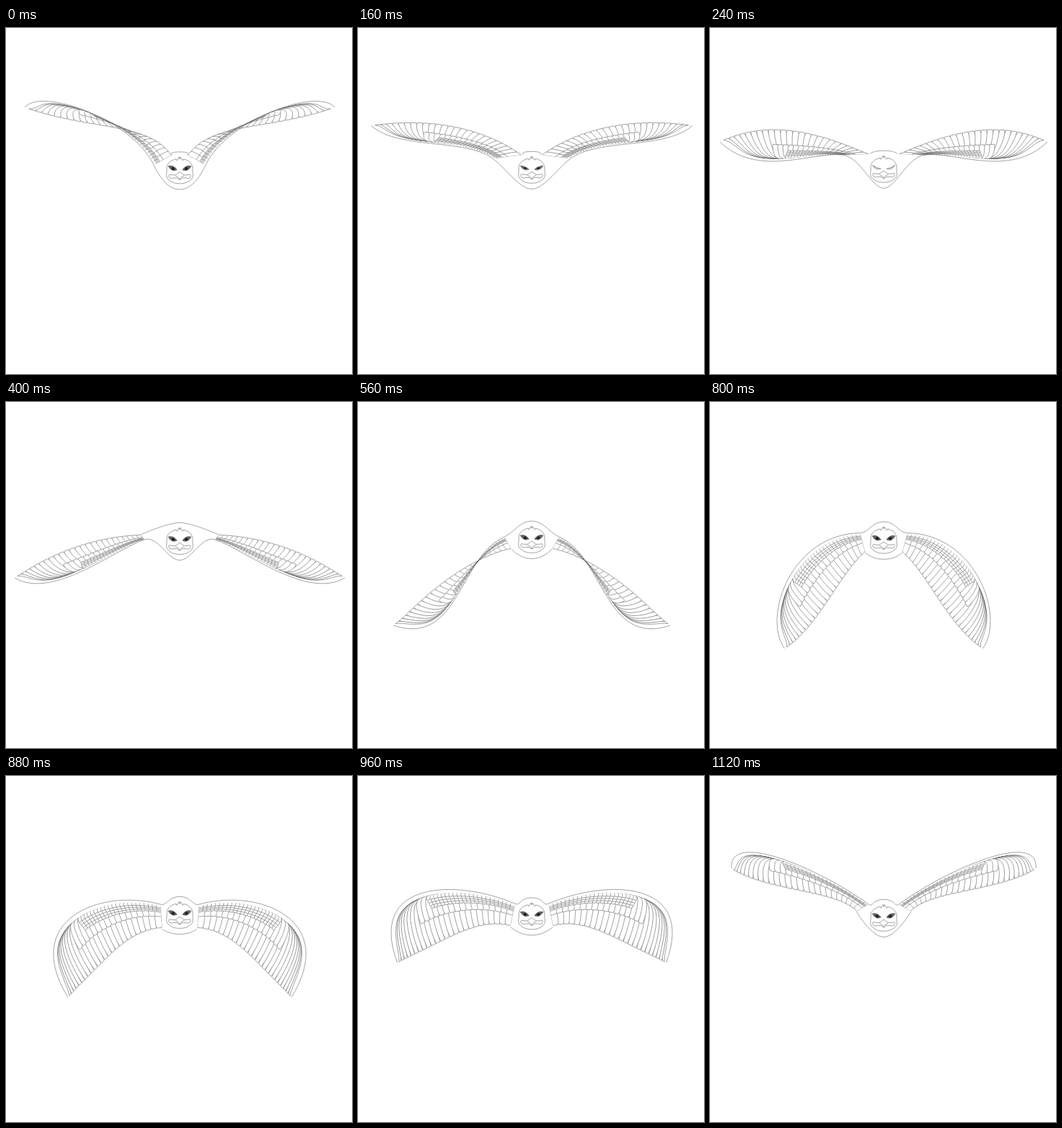
An HTML page with a canvas for the animation above (1200 ms loop, 480x480 px).

```html
<!DOCTYPE html>
<html lang="en">
<head>
<meta charset="utf-8">
<title>Bird in flight</title>
<style>
  html, body { margin: 0; width: 100%; height: 100%; overflow: hidden; background: #fff; }
  canvas { display: block; width: 100vw; height: 100vh; }
</style>
</head>
<body>
<canvas id="stage" width="480" height="480"></canvas>
<script>
const ctx = document.getElementById('stage').getContext('2d');
const LOOP = 1200, STEP = 80, MID = 241, PIVOT = 185;

// Left wing at key times, as two Bézier curves that share the wing tip
const poses = [
  { t: 0, tip: [26, 110], lead: [205,190, 175,127, 50,82], trail: [231,176, 195,125, 110,150] },
  { t: 240, tip: [14, 158], lead: [183,176, 140,172, 65,208], trail: [222,175, 165,150, 75,110] },
  { t: 400, tip: [12, 244], lead: [192,191, 150,205, 65,275], trail: [187,184, 135,185, 55,200] },
  { t: 560, tip: [49, 310], lead: [203,187, 140,215, 140,340], trail: [213,204, 160,214, 75,268] },
  { t: 720, tip: [103, 361], lead: [203,187, 110,215, 150,345], trail: [213,204, 200,255, 165,338] },
  { t: 880, tip: [86, 307], lead: [214,178, 130,155, 20,200], trail: [217,212, 150,218, 130,300] },
  { t: 1120, tip: [30, 128], lead: [220,178, 150,127, 25,75], trail: [203,188, 170,155, 70,170] }
];

const lerp = (a, b, k) => a + (b - a) * k;
const mix = (p, q, k) => p.map((v, i) => lerp(v, q[i], k));
const range = (n, make) => Array.from({ length: n + 1 }, (_, i) => make(i / n));

function bezier(pts, k) {
  while (pts.length > 1) pts = pts.slice(1).map((p, i) => mix(pts[i], p, k));
  return pts[0];
}

// Wing points swing about the shoulder, so they are blended as angle and radius
function polar(pose) {
  const flat = [...pose.lead, ...pose.tip, ...pose.trail, ...pose.tip];
  return range(7, k => {
    const i = Math.round(k * 7) * 2, dx = MID - flat[i], dy = flat[i + 1] - PIVOT;
    return [Math.atan2(dy, dx), Math.hypot(dx, dy)];
  });
}

const keys = poses.map(pose => ({ t: pose.t, pts: polar(pose) }));

function keyAt(i) {
  const turn = Math.floor(i / keys.length);
  const { t, pts } = keys[i - turn * keys.length];
  return { t: t + turn * LOOP, pts };
}

function wingAt(time) {
  const i = keys.findLastIndex(key => key.t <= time);
  const [a, b, c, d] = [-1, 0, 1, 2].map(n => keyAt(i + n));
  const gap = c.t - b.t, k = (time - b.t) / gap;
  const pts = b.pts.map((p, j) => {
    const [angle, radius] = p.map((v, axis) => {
      const next = c.pts[j][axis];
      const slopeIn = (next - a.pts[j][axis]) / (c.t - a.t) * gap;
      const slopeOut = (d.pts[j][axis] - v) / (d.t - b.t) * gap;
      return bezier([[v], [v + slopeIn / 3], [next - slopeOut / 3], [next]], k)[0];
    });
    return [MID - radius * Math.cos(angle), PIVOT + radius * Math.sin(angle)];
  });
  return { lead: pts.slice(0, 4), trail: pts.slice(4) };
}

function trace(points) {
  ctx.beginPath();
  points.forEach(p => ctx.lineTo(...p));
}

// Point on the feather that ends at u along the wing; outer ones hug the leading edge
function quill({ lead, trail }, u, s, depth) {
  u = Math.max(0, Math.min(1, u));
  const x = lerp(u - 0.42 * u * u * depth, u, s);
  const v = lerp(0.08, depth, s ** (1 + 3 * u * u));
  return mix(bezier(lead, x), bezier(trail, x), v);
}

function featherRow(wing, count, span, depth) {
  const gap = span / count;
  for (let i = count; i > 0; i--) {
    const side = sign => range(18, s => {
      const width = s < 0.82 ? 0.56 : 0.56 * Math.sqrt(1 - ((s - 0.82) / 0.18) ** 2);
      return quill(wing, (i - 0.5 + sign * width) * gap, s, depth);
    });
    trace([...side(1), ...side(-1).reverse()]);
    ctx.fill();
    ctx.stroke();
  }
}

function drawWing(wing) {
  featherRow(wing, 25, 1, 1);
  featherRow(wing, 17, 0.62, 0.53);
  for (let depth = 0.34; depth > 0.15; depth -= 0.06) featherRow(wing, 22, 0.5, depth);
  trace(range(32, k => bezier(wing.lead, k)));
  ctx.stroke();
}

// Crown and chest run into whichever wing edge is upper and lower
function drawBody({ lead, trail }, y) {
  const edges = [lead, trail].sort((a, b) => a[0][1] - b[0][1]);
  const [crown, chest] = edges.map((edge, i) => {
    const start = [MID, y + (i ? 26 : -26)], [end, handle] = edge;
    const reach = Math.hypot(start[0] - end[0], start[1] - end[1]) * 0.35;
    const back = edge === lead
      ? -reach / Math.hypot(handle[0] - end[0], handle[1] - end[1]) : 0;
    return range(24, k => bezier([start, [MID - 17, start[1]], mix(end, handle, back), end], k));
  });
  trace([...crown, ...[...chest].reverse()]);
  ctx.fill();
  for (const line of [crown, chest]) {
    trace(line);
    ctx.stroke();
  }
}

function drawFace(y, open) {
  const line = d => ctx.stroke(new Path2D(d));
  ctx.save();
  ctx.translate(MID, y);
  line('M-5 -16C-12 -15 -18 -10 -18 -3C-17 1 -20 6 -17 11Q-11 18 0 18');
  line('M-5 -16L-4 -14L-1 -19L0 -16');
  line('M-15 8Q-16 4 -11 6Q-5 7 -3 4Q-1 2 0 2');
  line('M-15 8Q-14 12 -8 10Q-3 9 0 13M-6 7Q-2 8 0 12');
  const lid = `M-16 -6Q-9 ${-1 - 7 * open} -4 -1`;
  ctx.fillStyle = '#666';
  ctx.fill(new Path2D(`${lid}Q-11 ${-1 + 3 * open} -16 -6`));
  ctx.fillStyle = '#222';
  ctx.beginPath();
  ctx.ellipse(-9, -3, 2.4, 2.4 * open, 0, 0, 7);
  ctx.fill();
  line('M-15 -5Q-11 2 -4 -1');
  ctx.lineWidth = 0.7 + 0.5 * open;
  line(lid);
  ctx.restore();
}

function mirrored(draw) {
  draw();
  ctx.save();
  ctx.translate(2 * MID, 0);
  ctx.scale(-1, 1);
  draw();
  ctx.restore();
}

function frame(now) {
  const time = Math.floor(now % LOOP / STEP) * STEP;
  const wing = wingAt(time);
  const headY = 194.5 + 3.5 * Math.cos((time - 40) / LOOP * 2 * Math.PI);
  const open = Math.min(1, Math.abs(time - 240) / 120);
  ctx.fillStyle = '#fff';
  ctx.fillRect(0, 0, 480, 480);
  ctx.strokeStyle = '#666';
  ctx.lineWidth = 0.6;
  ctx.lineJoin = 'round';
  mirrored(() => drawWing(wing));
  mirrored(() => drawBody(wing, headY));
  mirrored(() => drawFace(headY, open));
  requestAnimationFrame(frame);
}
requestAnimationFrame(frame);
</script>
</body>
</html>
```
